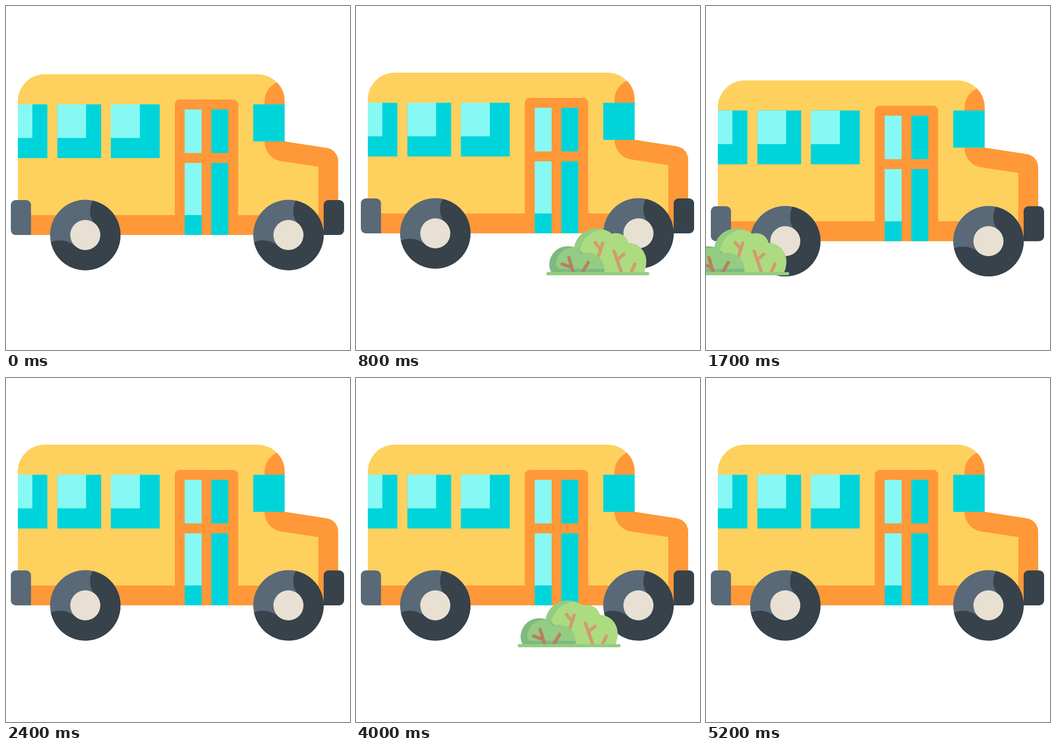
Animation, 640 px wide and 640 px high, one loop 6.4 s. Source, as an HTML page:

```html
<!DOCTYPE html>
<html lang="en">
<head>
<meta charset="utf-8">
<title>School bus</title>
<style>
  html, body { margin: 0; width: 100%; height: 100%; overflow: hidden; background: #fff; }
  svg { display: block; width: 100%; height: 100%; }
  .yellow { fill: #fed05e; }
  .orange { fill: #ff9839; }
  .glass { fill: #00d4db; }
  .shine { fill: #86f9f4; }
  .grey { fill: #596977; }
  .dark { fill: #37424a; }
  .twigs { fill: none; stroke-width: 6; stroke-linecap: round; }
</style>
</head>
<body>
<svg viewBox="0 0 640 640">
  <defs>
    <g id="wheel">
      <circle class="grey" r="65.5"/>
      <path class="dark" d="M13.5-64A65.5 65.5 0 1 1-64 13.5C-48 6-30 11-18 21L21-18C9-28 5-46 13.5-64Z"/>
      <circle r="28" fill="#e8e0d3"/>
    </g>
  </defs>

  <g id="bus">
    <path class="yellow" d="M22 423V174a50 50 0 0 1 50-50H468a50 50 0 0 1 50 50V249L596 261C609 263 618 273 618 286V423Z"/>
    <path class="orange" d="M46 386H600V423H46Z
      M481 249H518.5L596 261C609 263 618 273 618 286V423H581V296L512 285.5C494 283 481 267 481 249Z
      M504 139C513 148 518.5 160 518.5 174V181H481V175C481 158 490 146 504 139Z
      M314 423V180a9 9 0 0 1 9-9H423a9 9 0 0 1 9 9V423Z"/>
    <path class="glass" d="M22 180H77V280H22Z M95.5 180H177V280H95.5Z M195 180H286V280H195Z
      M460 180H518.5V249H460Z M382 189.5H413.5V270.5H382Z M382 289H413.5V423H382Z M332.5 386H364V423H332.5Z"/>
    <path class="shine" d="M22 180H49V242.5H22Z M95.5 180H149V242.5H95.5Z M195 180H249V242.5H195Z
      M332.5 189.5H364V270.5H332.5Z M332.5 289H364V386H332.5Z"/>
    <path class="grey" d="M46.5 423H18a9 9 0 0 1-9-9V367a9 9 0 0 1 9-9H37.5a9 9 0 0 1 9 9Z"/>
    <path class="dark" d="M591 423H620a9 9 0 0 0 9-9V367a9 9 0 0 0-9-9H600a9 9 0 0 0-9 9Z"/>
    <use href="#wheel" x="147.5" y="423"/>
    <use href="#wheel" x="525.5" y="423"/>
  </g>

  <g id="bush">
    <path fill="#94cc83" d="M60 495L52 462C48 434 70 414 92 414C104 414 115 417 122 424C133 420 149 425 153 441C172 441 186 457 186 475C186 483 184 490 182 495Z"/>
    <path fill="#acdb80" d="M80 495L63 466C60 438 80 418 105 416C112 418 118 420 122 424C133 420 149 425 153 441C172 441 186 457 186 475C186 483 184 490 182 495Z"/>
    <path class="twigs" stroke="#d29b6e" d="M105 441L97 466M91 440L100 451M126 456L139.5 495M144 462L133 471M165 480L158 495"/>
    <path fill="#7dba82" d="M9 495C7 491 5.5 487 5.5 482C5.5 463 20 447 40 447C47 447 52 448 56 450L108 489V495Z"/>
    <path fill="#94cc83" d="M54 449C30 449 18 466 18 479C18 484 20 487 24 489H108C107 471 92 459 78 459C73 459 69 460 65 461C62 455 58 451 54 449Z"/>
    <path class="twigs" stroke="#b87f5e" d="M42 468L50 495M29.5 480L46 486M78 477L67.5 495"/>
    <rect y="495" width="191.5" height="6" rx="3" fill="#94cc83"/>
  </g>
</svg>
<script>
const LOOP = 6400, TICK = 100, LAST_TICK = 52;
const BUSH_PERIOD = 77, BUSH_STEP = 17.75, BUSH_START = 709;
const DIP_PERIOD = 1930, DIP_DOWN = 150, DIP_UP = 330, DIP_DEPTH = 14.5;

const bus = document.getElementById('bus');
const bush = document.getElementById('bush');
const ease = p => (1 - Math.cos(Math.PI * Math.min(1, Math.max(0, p)))) / 2;
const move = (part, x, y) => part.setAttribute('transform', `translate(${x} ${y})`);

// The suspension sinks quickly, then recovers more slowly.
function dip(time) {
  const t = (time + 380) % DIP_PERIOD;
  return DIP_DEPTH * (ease(t / DIP_DOWN) - ease((t - DIP_DOWN) / DIP_UP));
}

function draw(now) {
  const tick = Math.min(LAST_TICK, Math.floor(now % LOOP / TICK));
  const step = Math.floor(tick * 2.5) % BUSH_PERIOD;
  move(bus, 0, dip(tick * TICK));
  move(bush, BUSH_START - BUSH_STEP * step, 0);
}

const start = performance.now();
function play() {
  draw(performance.now() - start);
  requestAnimationFrame(play);
}
play();
</script>
</body>
</html>
```
